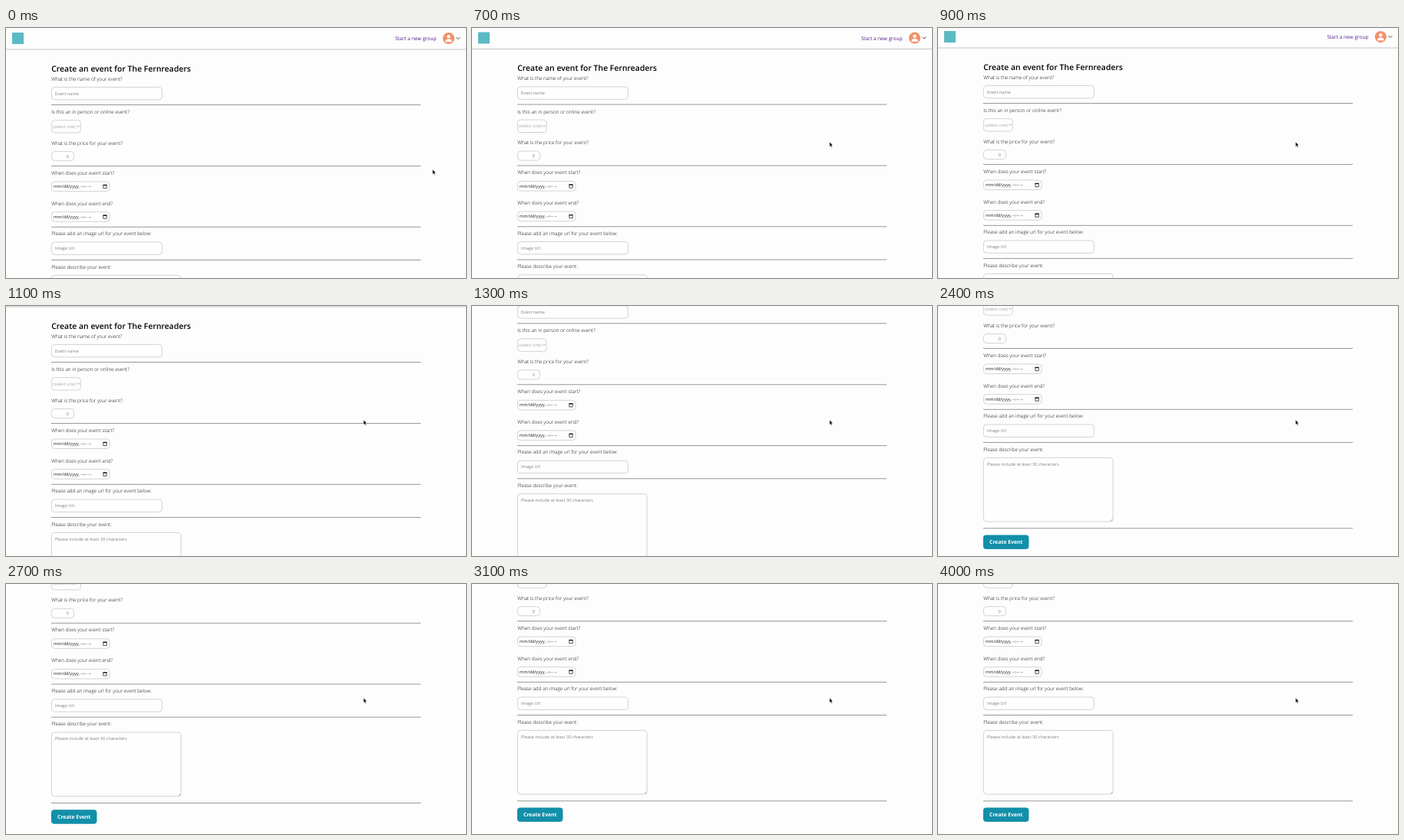
These frames come from a looping animation (600 by 327 pixels, 4.1 s). An HTML page:

```html
<!DOCTYPE html>
<html lang="en">
<head>
<meta charset="utf-8">
<title>Create an event</title>
<style>
  html, body { margin: 0; width: 100%; height: 100%; overflow: hidden; background: #fdfdfd; }
  svg { display: block; width: 600px; height: 327px; font-family: "Open Sans", sans-serif; }
  text { white-space: pre; text-rendering: geometricPrecision; }
  .label { font-size: 6.42px; font-weight: 300; fill: #000; }
  .hint { font-size: 5.6px; fill: #808080; }
  .date { font-size: 5.6px; fill: #222; }
  .box { fill: #fefefe; stroke: #c8c8c8; stroke-width: .8; }
  .rule { stroke: #8d8d8d; stroke-width: .9; }
  .thin { fill: none; stroke-width: .9; }
</style>
</head>
<body>
<svg viewBox="0 0 600 327">
  <g id="page">
    <path d="M0 28H600" stroke="#c4c4c4"/>
    <rect x="8" y="6" width="15" height="15" fill="#5cbac4"/>
    <text x="507.4" y="16.2" font-size="6.57" fill="#5a1f8c">Start a new group</text>
    <circle cx="577.4" cy="13.5" r="7.6" fill="#f4906c"/>
    <circle cx="577.4" cy="11.3" r="2.2" fill="#fff"/>
    <path d="M573.2 18.2v-.6q0-3 4.2-3t4.2 3v.6z" fill="#fff"/>
    <path class="thin" d="M587.5 12.2l2.4 2.4 2.4-2.4" stroke="#333"/>
    <text x="59.2" y="56.6" font-size="10.45" font-weight="600">Create an event for The Fernreaders</text>
    <g id="form"></g>
    <path class="thin" d="M92.6 127.8l1.6 1.6 1.6-1.6" stroke="#999"/>
    <path d="M225 406.3l2.7-2.7M226.7 406.5l1.1-1.1" stroke="#777" stroke-width=".5"/>
    <rect x="59" y="424.6" width="59.5" height="18.4" rx="4" fill="#128fa9"/>
    <text x="88.8" y="436.4" font-size="6.85" font-weight="700" fill="#fff" text-anchor="middle">Create Event</text>
  </g>
  <path id="cursor" d="M0 0V6.2L1.4 5 2.4 7.2 3.4 6.8 2.4 4.6H4.3Z" fill="#000" stroke="#fff" stroke-width=".4"/>
</svg>
<script>
const form = document.getElementById('form');
const page = document.getElementById('page');
const cursor = document.getElementById('cursor');
const parts = [];

const text = (cls, x, y, str) => parts.push(`<text class="${cls}" x="${x}" y="${y}">${str}</text>`);
const box = (y, w, h, r = 4) =>
  parts.push(`<rect class="box" x="59.4" y="${y}" width="${w}" height="${h}" rx="${r}"/>`);

[[68.7, 'What is the name of your event?'], [112, 'Is this an in person or online event?'],
 [152.8, 'What is the price for your event?'], [191.8, 'When does your event start?'],
 [231.5, 'When does your event end?'], [271.2, 'Please add an image url for your event below:'],
 [314.7, 'Please describe your event:']].forEach(([y, str]) => text('label', 59.2, y, str));

[100.5, 180.5, 260.3, 303.5, 415.8].forEach(y =>
  parts.push(`<path class="rule" d="M59 ${y}H541"/>`));

box(77.4, 144.2, 16.4);
text('hint', 64, 87.5, 'Event name');
box(120.6, 38, 16.4);
text('hint" opacity=".7', 61.2, 130.6, '(select one)');
box(161.6, 29.2, 12);
text('hint', 78.8, 169.6, '0');
for (const y of [201, 240.6]) {
  box(y, 75.8, 12.6);
  text('date', 62, y + 8.2, 'mm/dd/yyyy, --:-- --');
  parts.push(`<path d="M126.9 ${y + 4.4}h4.4v4.3h-4.4z" fill="none" stroke="#111" stroke-width=".7"/>
    <path d="M126.6 ${y + 4.5}h5" stroke="#111" stroke-width="1.3"/>`);
}
box(280, 144.2, 16.4);
text('hint', 64, 290.2, 'Image Url');
box(323.4, 168.8, 83.6);
text('hint', 64, 333.5, 'Please include at least 30 characters');
form.innerHTML = parts.join('');

// Linear interpolation through [step, value] keys.
function track(keys, n) {
  const i = keys.findIndex(k => k[0] >= n);
  if (i < 0) return keys[keys.length - 1][1];
  if (i === 0) return keys[0][1];
  const [a, u] = keys[i - 1], [b, v] = keys[i];
  return u + (v - u) * (n - a) / (b - a);
}

const scroll = [[6, 0], [7, .5], [9, 2], [10, 9], [11, 27], [12, 52], [13, 77.7], [14, 105],
  [15, 121.5], [19, 121.5], [20, 122], [24, 125], [25, 125.3], [26, 127], [27, 129.3],
  [28, 130.5], [29, 131.3], [31, 132]];
const glide = [[0, 0], [1, .15], [2, .5], [3, .82], [4, .96], [5, 1]];

function draw(now) {
  const n = Math.floor(now % 4100 / 100);
  const g = track(glide, n);
  page.setAttribute('transform', `translate(0 ${-track(scroll, n)})`);
  cursor.setAttribute('transform', `translate(${556.4 - 90 * g} ${185 - 36 * g})`);
  requestAnimationFrame(draw);
}
const start = performance.now();
requestAnimationFrame(now => draw(Math.max(0, now - start)));
</script>
</body>
</html>
```
